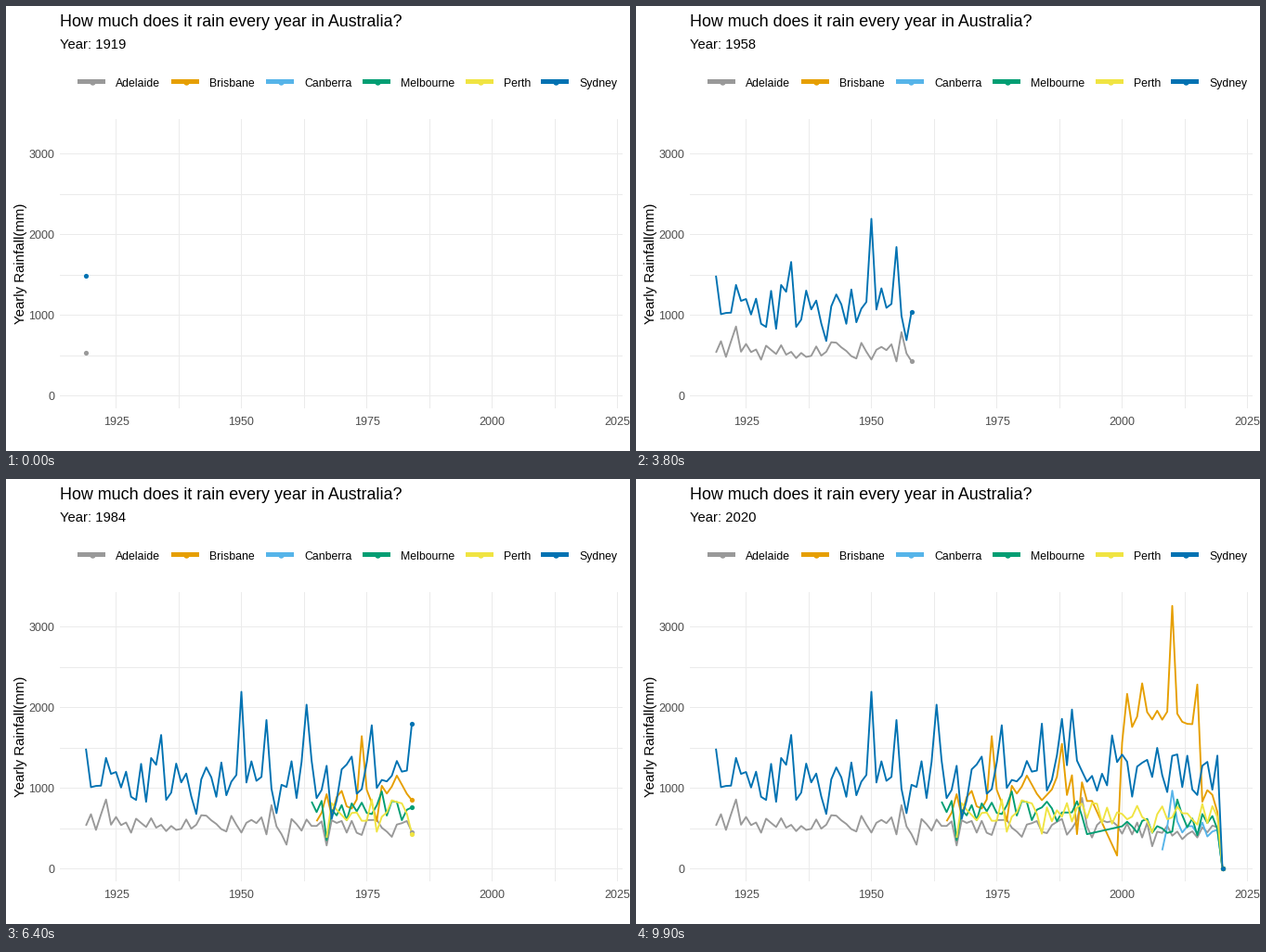
A matplotlib script that plays this animation: 672x480 px, repeating every 10 s.

```python
import matplotlib.pyplot as plt
import numpy as np
from matplotlib.animation import FuncAnimation

W, H, DPI = 672, 480, 100
FRAMES, INTERVAL = 100, 100
FIRST, LAST = 1919, 2020
PT = 72 / DPI  # points per pixel

plt.rcParams["font.family"] = "Liberation Sans"


def rainfall(seed, start, level, spread, keys, gap=(0, 0)):
    """Random yearly totals around a level, with a few fixed wet and dry years."""
    rng = np.random.default_rng(seed)
    years = np.arange(start, LAST + 1)
    mm = np.interp(years, list(level), list(level.values()))
    mm += spread * rng.uniform(-1, 1, len(years))
    for year, value in keys.items():
        mm[year - start] = value
    mm[-1] = 10  # the last year has barely begun
    known = (years <= gap[0]) | (years >= gap[1])
    return years[known], mm[known]


# name, colour, legend key x, yearly data
CITIES = [
    ("Adelaide", "#999999", 77, rainfall(
        1, 1919, {1919: 570, 2019: 480}, 120,
        {1919: 535, 1923: 860, 1956: 790, 1959: 300, 1967: 290, 1992: 880,
         2006: 280})),
    ("Brisbane", "#E69F00", 178, rainfall(
        2, 1965, {1965: 750, 1973: 950, 1994: 1000, 2001: 1700, 2015: 2000,
                  2016: 850, 2019: 750}, 200,
        {1965: 590, 1974: 1645, 1977: 590, 1988: 1550, 1991: 430, 1999: 165,
         2001: 2170, 2004: 2300, 2010: 3260, 2015: 2285}, gap=(1994, 1999))),
    ("Canberra", "#56B4E9", 280, rainfall(
        3, 2008, {2008: 600, 2019: 480}, 130, {2008: 230, 2010: 970})),
    ("Melbourne", "#009E73", 384, rainfall(
        4, 1964, {1964: 700, 1993: 700, 2000: 530, 2019: 560}, 150,
        {1967: 355, 1978: 960, 1993: 430, 2011: 860}, gap=(1993, 2000))),
    ("Perth", "#F0E442", 495, rainfall(
        5, 1967, {1967: 730, 2019: 680}, 140,
        {1967: 385, 1977: 460, 1984: 435, 2006: 450})),
    ("Sydney", "#0072B2", 576, rainfall(
        6, 1919, {1919: 1100, 2019: 1150}, 280,
        {1919: 1490, 1934: 1660, 1941: 680, 1950: 2195, 1955: 1845, 1957: 690,
         1963: 2035, 1968: 620, 1976: 1780, 1984: 1800, 1988: 1860, 1990: 1975,
         1998: 1655, 2007: 1500})),
]


def px(year):
    return 118.5 + (np.asarray(year) - 1925) * 5.4


def py(mm):
    return 420.5 - np.asarray(mm) * 0.087


def label(x, y, s, size, color="black", **kw):
    return ax.text(x, y, s, fontsize=size * PT, color=color, **kw)


def stroke(xs, ys, color, width, **kw):
    return ax.plot(xs, ys, color=color, lw=width * PT, snap=False,
                   solid_capstyle="butt", solid_joinstyle="round", **kw)[0]


def disc(xs, ys, color, size, **kw):
    return ax.plot(xs, ys, "o", color=color, ms=size * PT, mew=0, snap=False,
                   **kw)[0]


fig = plt.figure(figsize=(W / DPI, H / DPI), dpi=DPI, facecolor="white")
ax = fig.add_axes([0, 0, 1, 1])
ax.set_xlim(0, W)
ax.set_ylim(H, 0)
ax.axis("off")

# Grid, axis labels and titles
for mm in range(0, 3001, 500):
    y = np.floor(py(mm)) + 0.5
    stroke([58, 664], [y, y], "#EBEBEB", 1, zorder=1)
    if mm % 1000 == 0:
        label(52, y + 4.7, str(mm), 12.5, "#4D4D4D", ha="right")
for year in np.arange(1925, 2026, 12.5):
    x = np.floor(px(year)) + 0.5
    stroke([x, x], [122, 434], "#EBEBEB", 1, zorder=1)
    if year % 25 == 0:
        label(x, 452, f"{year:.0f}", 12.5, "#4D4D4D", ha="center")

label(58, 22, "How much does it rain every year in Australia?", 17.9)
subtitle = label(58, 46, "", 14.7)
label(20, 278, "Yearly Rainfall(mm)", 15, rotation=90, ha="center",
      va="baseline", rotation_mode="anchor")

# Legend keys and the animated line and dot of each city
series = []
for i, (name, color, x, (years, values)) in enumerate(CITIES):
    stroke([x, x + 30], [81.5, 81.5], color, 5)
    disc(x + 15.5, 81.5, color, 6.4)
    label(x + 41, 87, name, 12.3)
    line = stroke([], [], color, 1.9, zorder=3 + i)
    dot = disc([], [], color, 5.2, zorder=10 + i)
    series.append((line, dot, years, values))


def update(frame):
    now = round(FIRST + frame * (LAST - FIRST) / (FRAMES - 1))
    subtitle.set_text(f"Year: {now}")
    for line, dot, years, values in series:
        if now < years[0]:
            xs = ys = np.array([])
        else:
            past = years < now
            xs = px(np.append(years[past], now))
            ys = py(np.append(values[past], np.interp(now, years, values)))
        line.set_data(xs, ys)
        dot.set_data(xs[-1:], ys[-1:])
    return [subtitle] + [a for s in series for a in s[:2]]


anim = FuncAnimation(fig, update, frames=FRAMES, interval=INTERVAL,
                     repeat=True, repeat_delay=0)
plt.show()
```
